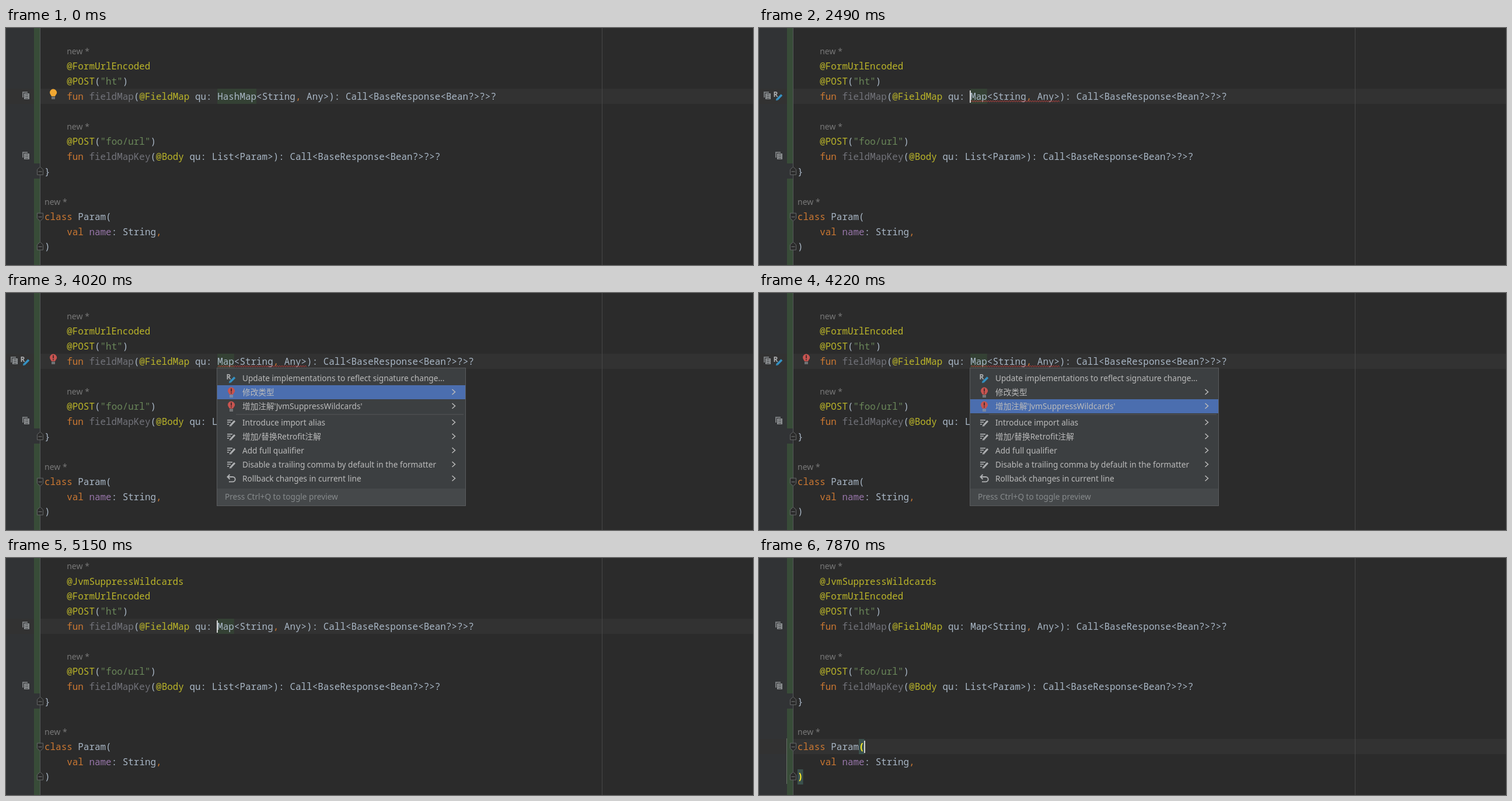
Animation, 1280 px wide and 406 px high, one loop 8 s. Source, as an HTML page with a canvas:

```html
<!DOCTYPE html>
<html lang="en">
<head>
<meta charset="utf-8">
<title>Editor quick fix</title>
<style>
  html, body { margin: 0; width: 100%; height: 100%; overflow: hidden; background: #2b2b2b; }
  canvas { display: block; width: 1280px; height: 406px; }
</style>
</head>
<body>
<canvas id="stage" width="1280" height="406"></canvas>
<script>
const ctx = document.getElementById('stage').getContext('2d');
const LOOP = 8000, LEFT = 66, CHAR = 9.555, PITCH = 25.75;
const MONO = '15.92px "Noto Sans Mono", "DejaVu Sans Mono", monospace';
const HINT = '14px "Noto Sans", "Open Sans", sans-serif';
const MENU = '13.65px "Noto Sans", "Noto Sans CJK SC", "Noto Sans CJK", sans-serif';

const colX = col => LEFT + col * CHAR;
const rowY = row => 14.2 + row * PITCH;
const rowTop = row => Math.round(rowY(row) - 13);

const T = { click: 1020, blink: 1620, erase: 1950, error: 2490, menu: 3230, close: 4540, insert: 4620,
  fixed: 5020, settle: 5150, leave: 5810, mark: 6210 };

// [start time, row, column]
const CARET = [[0, 4, 35], [T.erase, 4, 31], [T.leave, 5, 0], [6010, 7, 20], [6150, 8, 31],
  [6340, 9, 1], [6750, 10, 0], [7210, 12, 12], [7480, 13, 21], [7870, 12, 12]];

const TOKENS = [
  [/^@\w+/, '#bbb529'], [/^"[^"]*"/, '#6a8759'], [/^(fun|class|val)\b/, '#cc7832'],
  [/^fieldMap(Key)?\b/, '#72737a'], [/^name\b/, '#9876aa'], [/^,/, '#cc7832'],
  [/^\w+/, '#a9b7c6'], [/^\s+/, '#a9b7c6'], [/^[^\w\s@",]/, '#a9b7c6']
];

const MENU_ITEMS = [
  [146, 'refactor', 'Update implementations to reflect signature change...'],
  [170, 'bulb', '修改类型'],
  [194, 'bulb', "增加注解'JvmSuppressWildcards'"],
  [222, 'edit', 'Introduce import alias'],
  [246, 'edit', '增加/替换Retrofit注解'],
  [270, 'edit', 'Add full qualifier'],
  [294, 'edit', 'Disable a trailing comma by default in the formatter'],
  [318, 'undo', 'Rollback changes in current line']
];

function rect(x, y, w, h, color) {
  ctx.fillStyle = color;
  ctx.fillRect(x, y, w, h);
}

function text(str, x, y, color, font) {
  ctx.font = font;
  ctx.fillStyle = color;
  ctx.fillText(str, x, y);
}

function path(points, color, width = 1, close = false, fill) {
  ctx.beginPath();
  points.forEach(([x, y]) => ctx.lineTo(x, y));
  if (close) ctx.closePath();
  if (fill) { ctx.fillStyle = fill; ctx.fill(); }
  ctx.strokeStyle = color;
  ctx.lineWidth = width;
  ctx.stroke();
}

function at(x, y, draw) {
  ctx.save();
  ctx.translate(x, y);
  draw();
  ctx.restore();
}

function code(row, col, line) {
  while (line) {
    const [rule, color] = TOKENS.find(([re]) => re.test(line));
    const word = line.match(rule)[0];
    text(word, colX(col), rowY(row) + 5.6, color, MONO);
    col += word.length;
    line = line.slice(word.length);
  }
}

const hint = (row, col) => text('new *', colX(col), rowY(row) + 5.2, '#787878', HINT);

const mark = (row, col, length, color = '#344134') =>
  rect(colX(col), rowTop(row), length * CHAR, 26, color);

function bracket(row, col, char) {
  mark(row, col, 1, '#3b514d');
  text(char, colX(col), rowY(row) + 5.6, '#ffef28', 'bold ' + MONO);
}

function bulb(x, y, color, alert) {
  at(x, y, () => {
    ctx.beginPath();
    ctx.arc(0, -2.5, 6, Math.PI * 0.78, Math.PI * 2.22);
    ctx.lineTo(3, 4);
    ctx.lineTo(-3, 4);
    ctx.fillStyle = color;
    ctx.fill();
    rect(-3, 5, 6, 1.3, '#9a9da0');
    rect(-3, 7.3, 6, 1.3, '#9a9da0');
    if (alert) {
      rect(-0.9, -6.5, 1.8, 5.5, '#3c2a2a');
      rect(-0.9, 0.3, 1.8, 1.8, '#3c2a2a');
    }
  });
}

function copyIcon(x) {
  return y => at(x, y, () => {
    rect(-6, -7, 9, 10, '#787b7d');
    rect(-4, -5, 11, 12, '#313335');
    rect(-3, -4, 9, 10, '#8b8e90');
    for (const dy of [-2, 1, 4]) rect(-1, dy, 5, 1, '#45484a');
  });
}

function refactorIcon(x, y) {
  at(x, y, () => {
    text('R', -8.5, 2.3, '#afb1b3', 'bold 12px "Noto Sans", sans-serif');
    path([[-1.5, 6], [6, -1.5]], '#3592c4', 3.8);
    path([[-3.7, 8], [-3, 4.7], [-0.4, 7.3]], '#3592c4', 0.5, true, '#3592c4');
  });
}

function editIcon(x, y) {
  at(x, y, () => {
    for (const [dy, w] of [[-5, 9], [-1.5, 6], [2, 3]]) rect(-7, dy, w, 1.6, '#afb1b3');
    path([[-0.5, 4], [6, -3]], '#afb1b3', 3.2);
    path([[-3, 6.3], [-2, 3.2], [0.7, 5.6]], '#afb1b3', 0.5, true, '#afb1b3');
  });
}

function undoIcon(x, y) {
  at(x, y, () => {
    path([[-2.5, -7], [-6.5, -3], [-2.5, 1]], '#afb1b3', 1.9);
    ctx.beginPath();
    ctx.moveTo(-6, -3);
    ctx.lineTo(2.5, -3);
    ctx.arc(2.5, 1.2, 4.2, -Math.PI / 2, Math.PI / 2);
    ctx.lineTo(-4, 5.4);
    ctx.stroke();
  });
}

const ICONS = {
  refactor: refactorIcon, edit: editIcon, undo: undoIcon,
  bulb: (x, y) => bulb(x, y, '#c75450', true)
};

// Fold handle: a small house, pointing up (1) or down (-1).
function fold(y, dir) {
  const p = (x, dy) => [58.5 + x, y + dy * dir];
  path([p(0, -7.5), p(5, -3), p(5, 6), p(-5, 6), p(-5, -3)], '#656768', 1, true, '#2b2b2b');
  path([[55.5, y + 0.5], [61.5, y + 0.5]], '#7b7d7e');
}

function squiggle(from, to, y) {
  const points = [];
  for (let x = from, i = 0; x <= to; x += 2, i++) points.push([x, y + (i % 2 ? -1.2 : 1.2)]);
  path(points, '#bc3f3c');
}

function pointer(t) {
  let x, y;
  if (t < 70 || t >= 1220) return;
  if (t < 680) {
    const p = Math.min(6, Math.floor((t - 70) / 68)) / 6;
    const k = 1 - (1 - p) ** 2;
    x = 1075 + (390 - 1075) * k;
    y = 365 + (119.5 - 365) * k;
  } else if (t < 1086) {
    x = 390 + Math.min(3, Math.floor((t - 680) / 70) + 1) * 4.6;
    y = 119.5;
  } else {
    x = t < 1153 ? 410 : 420;
    y = t < 1153 ? 128 : 138;
  }
  x = Math.round(x) + 0.5;
  path([[x, y - 8], [x, y + 8]], '#c4c4c4');
  for (const dy of [-8, 8]) path([[x - 3, y + dy], [x + 3, y + dy]], '#c4c4c4');
}

function menu(t) {
  const chosen = t < 4020 ? 0 : t < 4220 ? 1 : 2;
  rect(361, 128, 427, 237, '#595b5d');
  rect(362, 129, 425, 235, '#3c3f41');
  rect(362, 134 + chosen * 24, 425, 24, '#4b6eaf');
  rect(394, 207.5, 390, 1, '#555759');
  rect(362, 335, 425, 29, '#45484a');
  MENU_ITEMS.forEach(([y, icon, label], i) => {
    ICONS[icon](386, y);
    text(label, 405, y + 5, '#bbbbbb', MENU);
    if (i) path([[764.5, y - 5], [769.5, y - 0.5], [764.5, y + 4]], '#bbbbbb', 1.5);
  });
  text('Press Ctrl+Q to toggle preview', 375, 354, '#868a8c', MENU);
}

function gutter(row) {
  rect(0, 0, 59, 406, '#313335');
  rect(0, rowTop(row), 59, 26, '#323232');
  rect(48, 0, 11, 232, '#384c38');
  rect(48, 258, 11, 148, '#384c38');
  rect(58, 0, 1, 406, '#55585a');
}

function codeLines(t) {
  const added = t >= T.insert, settled = t >= T.settle;
  if (added) code(settled ? 1 : 0, 4, '@JvmSuppressWildcards');
  hint(settled ? 0 : 1, 4);
  code(2, 4, '@FormUrlEncoded');
  code(3, 4, '@POST("ht")');
  const type = t < T.erase ? 'HashMap' : 'Map';
  code(4, 4, `fun fieldMap(@FieldMap qu: ${type}<String, Any>): Call<BaseResponse<Bean?>?>?`);
  hint(6, 4);
  code(7, 4, '@POST("foo/url")');
  code(8, 4, 'fun fieldMapKey(@Body qu: List<Param>): Call<BaseResponse<Bean?>?>?');
  code(9, 0, '}');
  hint(11, 0);
  code(12, 0, 'class Param(');
  code(13, 4, 'val name: String,');
  code(14, 0, ')');
}

function caretVisible(t) {
  return (t >= T.click && t < T.blink) || (t >= T.erase && t < T.menu) || t >= T.fixed;
}

function draw(t) {
  const [, row, col] = CARET.filter(([start]) => start <= t).pop();
  rect(0, 0, 1280, 406, '#2b2b2b');
  rect(59, rowTop(row), 1221, 26, '#323232');
  gutter(row);
  rect(1021, 0, 1, 406, '#484848');

  if (t < T.leave) mark(4, 31, t < T.erase ? 7 : 3);
  if (t >= T.mark && row === 8) mark(8, 30, 4);
  codeLines(t);

  if (row === 9) {
    bracket(9, 0, '}');
    rect(47, 0, 1, 258, '#687068');
  }
  if (row === 12) {
    bracket(12, 11, '(');
    bracket(14, 0, ')');
    rect(47, 309, 1, 78, '#687068');
  }
  fold(rowY(9) - 0.5, 1);
  fold(rowY(12), -1);
  fold(rowY(14) - 0.5, 1);

  const changed = t >= T.erase && t < T.insert;
  copyIcon(changed ? 14 : 34)(116);
  copyIcon(34)(219);
  if (changed) refactorIcon(33, 116);
  if (t < T.click) bulb(81, 113, '#f0a732');
  if (t >= T.menu && t < T.insert) bulb(81, 113, '#c75450', true);
  if (t >= T.error && t < T.fixed) squiggle(363, 515, 125.5);
  if (caretVisible(t)) rect(Math.round(colX(col)) - 1, rowTop(row) + 3, 2, 21, '#d0d0d0');
  if (t >= T.menu && t < T.close) menu(t);
  pointer(t);
}

const began = performance.now();
function tick() {
  draw((performance.now() - began) % LOOP);
  requestAnimationFrame(tick);
}
tick();
</script>
</body>
</html>
```
